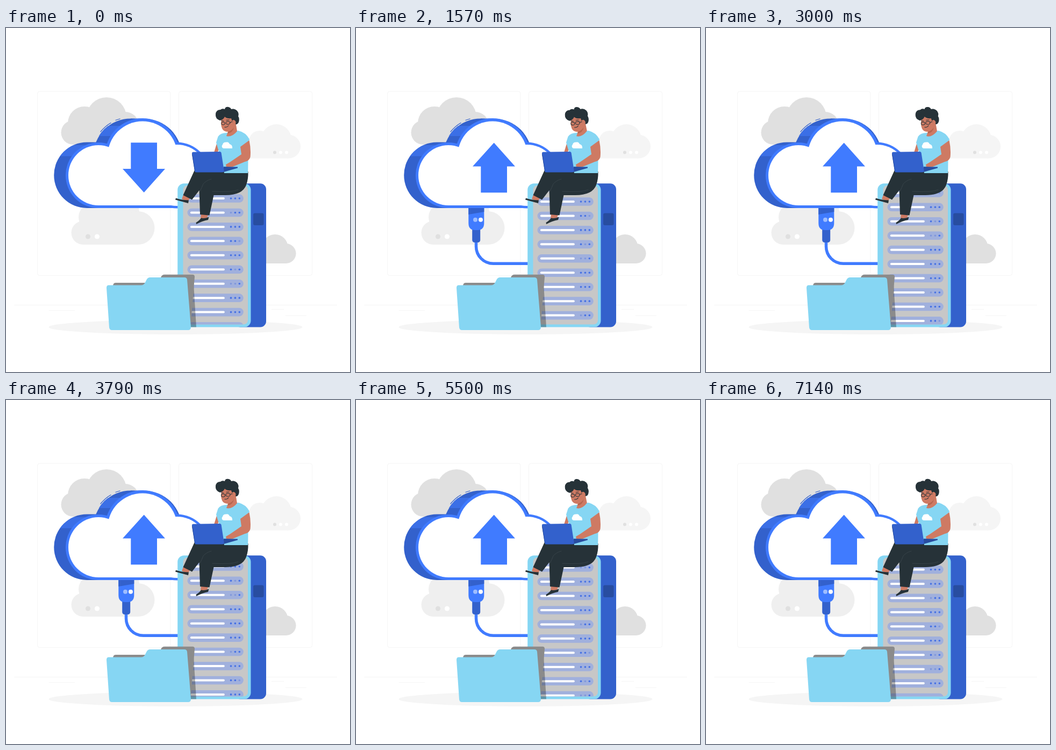
An HTML page that plays this animation: 640x640 px, repeating every 7.21 s.

```html
<!DOCTYPE html>
<html lang="en">
<head>
<meta charset="utf-8">
<title>Cloud hosting</title>
<style>
  html, body { margin: 0; height: 100%; overflow: hidden; background: #fff; }
  svg { display: block; width: 100vw; height: 100vh; }
  .blue { fill: #407bff; }
  .deep { fill: #3361cc; }
  .sky { fill: #86d6f3; }
  .ink { fill: #263238; }
  .skin { fill: #ce7a63; }
  .line { fill: none; stroke-linecap: round; stroke-linejoin: round; }
</style>
</head>
<body>
<svg viewBox="0 0 640 640">
  <defs>
    <clipPath id="panelClip"><rect x="329.5" y="293" width="120.5" height="258.5" rx="8"/></clipPath>
    <clipPath id="plugClip"><rect y="300" width="640" height="205"/></clipPath>
    <clipPath id="sideClip">
      <circle cx="150.500" cy="273.500" r="61"/><circle cx="232" cy="238" r="70"/>
    </clipPath>
  </defs>

  <!-- Room -->
  <g fill="none" stroke="#f5f5f5">
    <rect x="58.500" y="118" width="247.500" height="342.500" rx="4"/>
    <rect x="321.500" y="118" width="248" height="342.500" rx="4"/>
    <path d="M15 515.500H616M80 525.500H128M494 523.500H517M520 535H559"/>
  </g>
  <ellipse cx="315.500" cy="556.500" rx="236" ry="13.500" fill="#f5f5f5"/>

  <!-- Grey clouds -->
  <g fill="#e0e0e0">
    <circle cx="125" cy="194.500" r="22.500"/><circle cx="146" cy="177" r="31"/>
    <circle cx="187" cy="166" r="37"/><circle cx="222" cy="181" r="25"/>
    <rect x="125" y="180" width="115" height="37"/>
    <circle cx="500.500" cy="408" r="24"/><circle cx="521" cy="419.500" r="18.500"/>
    <rect x="480" y="410" width="41" height="28"/>
  </g>
  <g fill="#f5f5f5">
    <circle cx="503" cy="207" r="28"/><circle cx="472" cy="211" r="20"/>
    <circle cx="526" cy="220.500" r="22"/><rect x="450" y="212" width="76" height="30.500"/>
  </g>
  <g fill="#efefef">
    <circle cx="143.500" cy="381" r="22"/><circle cx="161" cy="352" r="26"/>
    <circle cx="200" cy="345" r="48"/><circle cx="245.500" cy="372" r="31"/>
    <rect x="143" y="360" width="103" height="43"/>
  </g>
  <g fill="#e0e0e0"><circle cx="500" cy="231.500" r="3"/><circle cx="152.500" cy="388" r="4.600"/></g>
  <g fill="#fff">
    <circle cx="511" cy="231.500" r="3"/><circle cx="522" cy="231.500" r="3"/>
    <circle cx="169.500" cy="388" r="4.600"/>
  </g>

  <!-- Plug and cable -->
  <g clip-path="url(#plugClip)">
    <g id="plug">
      <path class="line" d="M223.500 396V406A32 32 0 0 0 255.500 438.300H345" stroke="#407bff" stroke-width="5.500"/>
      <rect class="deep" x="216.200" y="366" width="15" height="33" rx="4.500"/>
      <path class="blue" d="M209.300 335H238.300V363Q238.300 376 226 376H221.500Q209.300 376 209.300 363Z"/>
      <path class="deep" d="M209.300 335H238.300V342L209.300 347Z"/>
      <circle cx="222" cy="356.700" r="4" fill="#9fbdff"/><circle cx="232" cy="356.700" r="4" fill="#fff"/>
    </g>
  </g>

  <!-- Big cloud -->
  <path class="deep" d="M150.500 212.500H172V335H150.500A61 61 0 0 1 150.500 212.500Z"/>
  <g class="deep">
    <circle cx="232" cy="238" r="69.500"/><circle cx="257.500" cy="238.500" r="69.500"/>
    <rect x="232" y="168.500" width="24" height="40"/>
  </g>
  <g clip-path="url(#sideClip)" fill="#3b6fe6">
    <rect x="88" y="218" width="60" height="20.500"/><rect x="160" y="182" width="75" height="19"/>
  </g>
  <g class="blue">
    <circle cx="172" cy="274" r="61"/><circle cx="254" cy="238" r="70"/><circle cx="318" cy="274" r="61.500"/>
    <rect x="172" y="260" width="150" height="75"/>
  </g>
  <g fill="#fff">
    <circle cx="172" cy="274" r="56"/><circle cx="254" cy="238.500" r="65"/><circle cx="318" cy="274" r="57"/>
    <rect x="172" y="260" width="150" height="70"/>
  </g>
  <path class="line" d="M176 193Q184 183 195 176.500M204 171.500L212 169" stroke="#3361cc" stroke-width="1.300"/>
  <path id="arrow" class="blue" d="M232.300 213.200H281V262H296L256.700 306L217 262H232.300Z"/>

  <!-- Server -->
  <rect class="deep" x="425" y="289.300" width="59" height="267.200" rx="11"/>
  <rect x="460" y="344.500" width="19.500" height="22.500" rx="3" fill="#284da0"/>
  <rect class="sky" x="319.200" y="289.300" width="136.300" height="267.200" rx="12"/>
  <rect x="329.500" y="293" width="120.500" height="258.500" rx="8" fill="#c7c7c7"/>
  <g clip-path="url(#panelClip)"><g id="rows"></g></g>

  <!-- Person -->
  <path class="skin" d="M393 212L386.500 233H393L398 220Z"/>
  <path class="skin" d="M331 308L327 318L338 323L345 312ZM363 345L362 355L374 353L377 345Z"/>
  <path class="ink" d="M316 316.500Q325 320 340 320.500L339 326L315 319.500ZM353.500 362Q360 358 363 353.500Q370 355 377.500 351.500L376 357Q365 359 354 365Z"/>
  <path class="ink" d="M352 262L329.500 311L346 319.500L359.500 302L361 347L378.500 348.500L386.500 311H408Q440 311 447 292Q451 281 450.500 267L400 264Z"/>
  <path class="line" d="M382 281Q372 284 367 290L361 304M384 304Q420 306 432 301" stroke="#3b474d" stroke-width=".8"/>
  <path class="sky" d="M411 195Q399 195 394.500 202L391 213L396 230L406 270L450 270Q451 245 450 215L453 207Q446 194 432 191Z"/>
  <path class="skin" d="M436 221L452.500 209Q456 225 454.500 240Q453 247 444 249L422 258L410 259L409 254L416 250L438 235Z"/>
  <path d="M405 224A4 4 0 0 1 403 217Q404 212 409.500 212.500Q414 211 416 216Q421.500 217 421 224Z" fill="#fff"/>
  <path d="M403 268.500L431 260.500V258.500L405 258Z" fill="#284da0"/>
  <path class="deep" d="M348 230.800L397.500 230Q400 230 400.500 232L405.500 264Q406 268.500 402 268.500H354Q351.500 268.500 351 266L346 234Q345.500 231 348 230.800Z"/>
  <path class="line" d="M346.500 235L351.500 266" stroke="#284da0" stroke-width="1"/>
  <g id="head">
    <path class="skin" d="M402 165Q398 177 402 187Q405 193 413 193L410 201Q420 204 430 192L428 180L425 165Z"/>
    <path d="M413 193Q420 191 424 185Q422 195 412.500 196Z" fill="#b5654f"/>
    <path class="ink" d="M398 172Q389 169 390 160Q391 152 399 152Q402 149 407 151Q408 146 414 147Q418 148 419 151Q425 149 430 154Q434 159 432 164Q435 169 433 175Q431 180 427 179Q426 171 421 174L419 168Q411 169 407 165Q404 171 398 172Z"/>
    <path class="skin" d="M420 176Q420 171 424 171Q429 173 427 179Q424 182 421 180Z"/>
    <g class="line" stroke="#263238" stroke-width="1">
      <ellipse cx="404" cy="177.500" rx="3.500" ry="2.700"/><ellipse cx="413" cy="176.500" rx="4" ry="2.800"/>
      <path d="M417 175.500L421 174.500M401 172.500L405 173M410 171.500L415 171"/>
      <path d="M407 184.500Q412 185 414 181.500"/>
    </g>
  </g>

  <!-- Folder -->
  <path d="M349 475L354 556.500H342Z" fill="#000" fill-opacity=".3"/>
  <path d="M198 482L200 476Q201 474 204 474H270L288 464Q290 458.800 295 458.800H347Q351 458.800 351 463L344 548L330 552H205Z" fill="#8b8b8b"/>
  <path class="sky" d="M187 483.500Q187 478.500 191 478.500H251Q256 478.500 258 475L262 467.500Q264 464 268 464H332Q336.500 464 337 468.500L344 556Q344 562 339 562H197Q192.500 562 192 557Z"/>
</svg>
<script>
const LOOP = 7210, STEPS = 101;
const ROW_GAP = 26.45, ROW_SPEED = 29.85, FIRST_ROW = 317;
const RISE_TIME = 1.35, RISE = 141, DOCK_GAP = 23.5;
// 1 = bright light, 0 = dim light; the patterns repeat down the rack
const LIGHTS = ["111", "011", "111", "110", "111", "101", "001", "111", "111"];

const byId = id => document.getElementById(id);
const move = (id, transform) => byId(id).setAttribute("transform", transform);

function rackRow(index) {
  const lights = [...LIGHTS[index % LIGHTS.length]].map((on, i) =>
    `<circle cx="${418.5 + 7.9 * i}" r="1.8" fill="${on === "1" ? "#4470e4" : "#7f97dc"}"/>`);
  return `<g transform="translate(0 ${FIRST_ROW + index * ROW_GAP})">
    <rect x="337.500" y="-7.800" width="104.300" height="15.600" rx="7.800" fill="#a0b0dd"/>
    <rect x="342.800" y="-2" width="64" height="4" rx="2" fill="#fff"/>${lights.join("")}</g>`;
}
byId("rows").innerHTML = Array.from({ length: 19 }, (_, i) => rackRow(i)).join("");

function draw(now) {
  const step = Math.floor((now % LOOP) / LOOP * STEPS + 0.1) % STEPS;
  const t = step * LOOP / STEPS / 1000;

  move("rows", `translate(0 ${-ROW_SPEED * t})`);

  const p = Math.min(1, t / RISE_TIME);
  const below = RISE * (1 - p * p * (3 - 2 * p));
  move("plug", `translate(${Math.min(1, below / DOCK_GAP)} ${below})`);
  move("arrow", p < 1 ? "" : "matrix(1 0 0 -1 0 519.5)");

  const tilt = -(1 - Math.cos(2 * Math.PI * t / 3.6));
  move("head", `rotate(${tilt} 418 198)`);

  requestAnimationFrame(() => draw(performance.now()));
}
draw(0);
</script>
</body>
</html>
```
